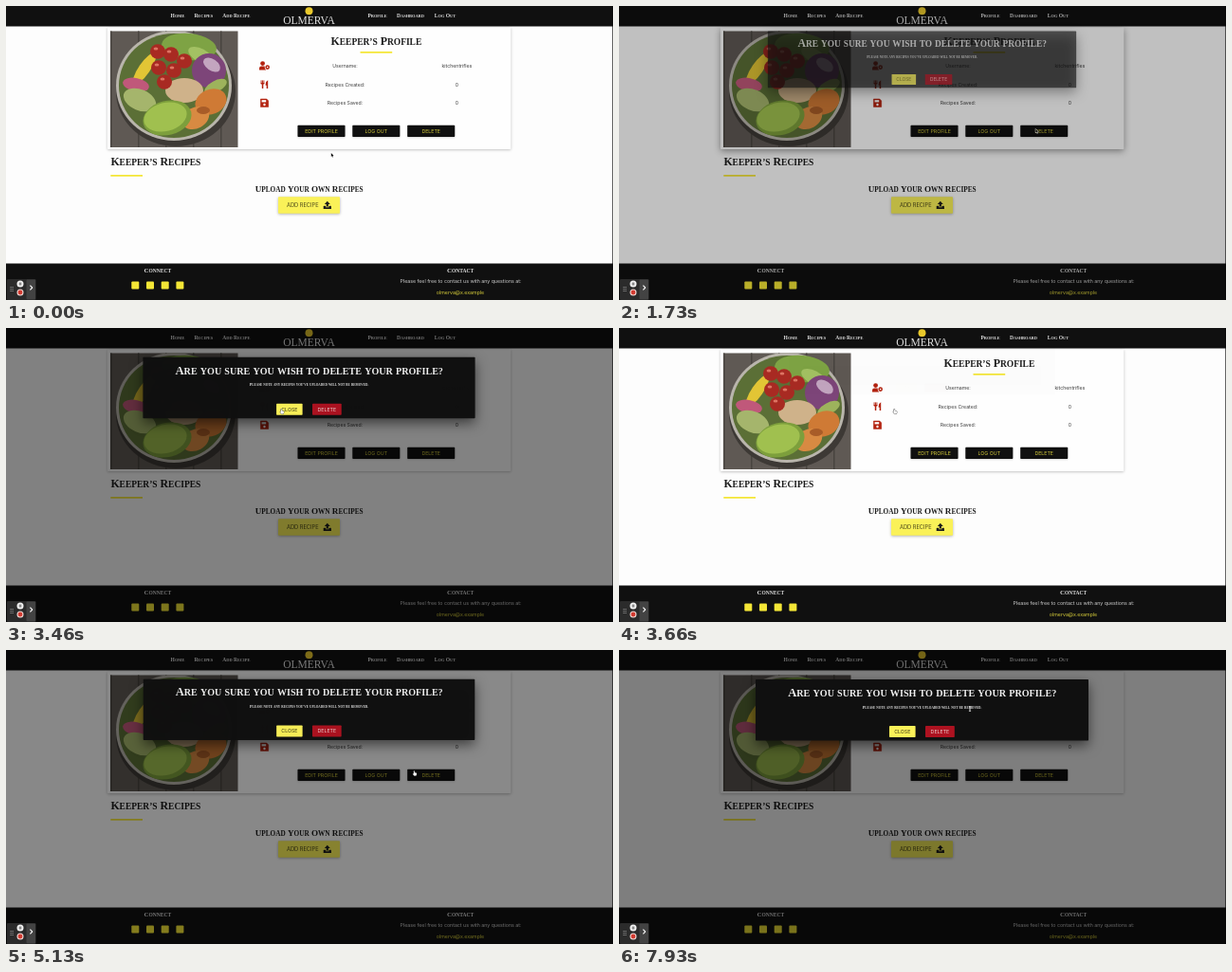
An HTML page with a canvas that plays this animation: 640 by 310 pixels, repeating every 8 s.

```html
<!DOCTYPE html>
<html lang="en">
<head>
<meta charset="utf-8">
<title>Recipe profile</title>
<style>
html, body { margin: 0; width: 100%; height: 100%; overflow: hidden; background: #fdfdfd; }
canvas { display: block; width: 640px; height: 310px; }
</style>
</head>
<body>
<canvas id="stage"></canvas>
<script>
const W = 640, H = 310, LOOP = 8000;
const BLACK = '#101010', YELLOW = '#f4e636', LEMON = '#faf158', RED = '#b3220f', INK = '#1c1c1c';
const SERIF = '"Liberation Serif", serif', SANS = 'Inter, sans-serif';

const canvas = document.getElementById('stage');
const c = canvas.getContext('2d');
const dpr = window.devicePixelRatio || 1;
canvas.width = W * dpr;
canvas.height = H * dpr;

const ramp = (t, start, len) => Math.min(1, Math.max(0, (t - start) / len));
const within = (t, a, b) => t >= a && t < b;
const outPow = (p, n) => 1 - Math.pow(1 - p, n);
const smooth = p => p * p * (3 - 2 * p);

function box(x, y, w, h, fill, r = 0) {
  c.fillStyle = fill;
  c.beginPath();
  c.roundRect(x, y, w, h, r);
  c.fill();
}

function blob(x, y, rx, ry, fill, turn = 0) {
  c.fillStyle = fill;
  c.beginPath();
  c.ellipse(x, y, rx, ry, turn, 0, Math.PI * 2);
  c.fill();
}

function poly(points, fill, stroke, width = 0.7) {
  c.beginPath();
  points.forEach(([x, y]) => c.lineTo(x, y));
  c.closePath();
  if (stroke) {
    c.strokeStyle = stroke;
    c.lineWidth = width;
    c.lineJoin = 'round';
    c.stroke();
  }
  c.fillStyle = fill;
  c.fill();
}

function line(x1, y1, x2, y2, color, width) {
  c.strokeStyle = color;
  c.lineWidth = width;
  c.beginPath();
  c.moveTo(x1, y1);
  c.lineTo(x2, y2);
  c.stroke();
}

function shadow(blur, dy, alpha) {
  c.shadowColor = `rgba(0,0,0,${alpha})`;
  c.shadowBlur = blur * dpr;
  c.shadowOffsetY = dy * dpr;
}

function noShadow() { c.shadowColor = 'transparent'; }

function label(str, x, y, size, color) {
  c.font = `${size}px ${SANS}`;
  c.textAlign = 'center';
  c.fillStyle = color;
  c.fillText(str, x, y);
}

// Engraved capitals: lower-case letters become smaller capitals.
function caps(str, x, y, size, color, left = false) {
  const runs = str.match(/[a-z’?.]+|[^a-z’?.]+/g).map(run => {
    const px = /[a-z’?.]/.test(run) ? size * 0.8 : size;
    const font = `bold ${px}px ${SERIF}`;
    const text = run.toUpperCase();
    c.font = font;
    return { font, text, w: c.measureText(text).width };
  });
  if (!left) x -= runs.reduce((sum, r) => sum + r.w, 0) / 2;
  c.textAlign = 'left';
  c.fillStyle = color;
  for (const r of runs) {
    c.font = r.font;
    c.fillText(r.text, x, y);
    x += r.w;
  }
}

function photo() {
  c.save();
  c.beginPath();
  c.rect(110, 26.5, 134.5, 122.5);
  c.clip();
  box(110, 26, 135, 124, '#5f5954');
  for (let i = 0; i < 5; i++) box(110 + i * 29, 26, 1.5, 124, '#49443f');
  blob(179, 90, 63, 58, '#3d3935');
  blob(177, 84, 61, 58, '#b9b5ac');
  blob(177, 84, 58, 55, '#5b6f36');
  blob(193, 43, 29, 14, '#7ea344', 0.1);
  blob(205, 52, 14, 7, '#a3c163', 0.5);
  blob(214, 68, 18, 18, '#7d4579');
  blob(217, 62, 10, 6, '#c3a5bf', 0.6);
  blob(221, 85, 13, 6, '#9db35c', -0.5);
  blob(146, 66, 6, 20, '#e2c535', 0.6);
  blob(137, 83, 14, 7, '#c0587a', 0.2);
  blob(141, 99, 18, 11, '#a5b56c', 0.4);
  blob(188, 89, 20, 13, '#cfb28a');
  blob(216, 101, 17, 13, '#cf7a35', -0.4);
  blob(200, 118, 15, 11, '#d88a42', -0.5);
  blob(208, 110, 7, 4, '#a85c28');
  blob(170, 118, 26, 18, '#7d9f3c', -0.25);
  blob(168, 117, 23, 15, '#a0c04f', -0.25);
  for (const [x, y] of [[160, 48], [174, 51], [161, 65], [177, 68], [188, 58], [167, 80]]) {
    blob(x, y, 8, 7.8, '#a82a22');
    blob(x - 2, y - 3, 2.4, 1.6, '#dd7463');
  }
  c.restore();
}

function rowIcons() {
  // user with gear
  blob(270.6, 60.6, 2.4, 2.4, RED);
  box(267, 63.6, 7.2, 3.8, RED, [2.2, 2.2, 0.5, 0.5]);
  blob(275.7, 64.6, 2.9, 2.9, '#fff');
  blob(275.7, 64.6, 2.3, 2.3, RED);
  blob(275.7, 64.6, 0.8, 0.8, '#fff');
  // fork and knife
  for (const x of [269.1, 270.5, 271.9]) line(x, 78.4, x, 82, RED, 0.9);
  box(268.6, 81, 3.8, 1.6, RED, 0.8);
  box(269.8, 82, 1.5, 5, RED, 0.5);
  poly([[276.2, 78.3], [276.2, 87], [274.7, 87], [274.7, 83.8], [273.5, 83.6], [274.2, 80]], RED);
  // disk
  poly([[268.4, 98], [274.8, 98], [276.7, 99.9], [276.7, 106.4], [268.4, 106.4]], RED, RED, 0.5);
  box(269.6, 99.2, 4.6, 2.2, '#fff');
  blob(272.5, 104, 1.2, 1.2, '#fff');
}

function button(text, x, hover, hideText) {
  shadow(2, 0.7, 0.22);
  box(x, 125.7, 50, 12.2, hover ? LEMON : BLACK, 0.7);
  noShadow();
  if (!hideText) label(text, x + 25, 133.8, 5.25, hover ? '#4c4918' : '#d9cf3a');
}

function header() {
  box(0, 0, W, 21.6, BLACK);
  const nav = [['Home', 181], ['Recipes', 208.3], ['Add Recipe', 242.8],
    ['Profile', 391.5], ['Dashboard', 426.5], ['Log Out', 463]];
  for (const [text, x] of nav) caps(text, x, 12.3, 5.5, '#dedede');
  blob(319.5, 5.2, 4, 4, '#e9c92c');
  c.font = `11.5px ${SERIF}`;
  c.textAlign = 'center';
  c.fillStyle = '#e0e0e0';
  c.fillText('OLMERVA', 319.5, 18.8);
}

function footer() {
  box(0, 271.6, W, 39, BLACK);
  caps('Connect', 159.8, 280.8, 6.9, '#dedede');
  caps('Contact', 479, 280.8, 6.9, '#dedede');
  for (let i = 0; i < 4; i++) box(132.3 + i * 15.7, 290.4, 8, 8, YELLOW, 1);
  label('Please feel free to contact us with any questions at:', 479.5, 292.2, 5.25, '#cfcfcf');
  label('olmerva@x.example', 479, 304.2, 5.25, '#d9cf3a');
}

function page(lift, delHover, delBlank) {
  box(0, 0, W, H, '#fdfdfd');
  shadow(3 + 6 * lift, 0.8 + 1.7 * lift, 0.26 + 0.2 * lift);
  box(107, 22.5, 425.3, 128.5, '#fefefe', 0.7);
  noShadow();
  photo();
  caps('Keeper’s Profile', 390.4, 40.7, 11.85, INK);
  box(373.5, 48.1, 33.7, 1.6, YELLOW);
  rowIcons();
  const rows = [['Username:', 'kitchentrifles'], ['Recipes Created:', '0'], ['Recipes Saved:', '0']];
  rows.forEach(([name, value], i) => {
    const y = 64.9 + i * 19.7;
    label(name, 357.5, y, 5.2, '#3c3c3c');
    label(value, 475.4, y, 5.2, '#3c3c3c');
  });
  button('EDIT PROFILE', 307.5);
  button('LOG OUT', 365.3);
  button('DELETE', 423.2, delHover, delBlank);

  caps('Keeper’s Recipes', 110.4, 168.1, 11.85, INK, true);
  box(110.3, 178.1, 33.7, 1.6, YELLOW);
  caps('Upload Your Own Recipes', 319.7, 195.8, 9.1, INK);
  shadow(3, 0.8, 0.32);
  box(287, 201.3, 65, 17.4, LEMON, 0.7);
  noShadow();
  label('ADD RECIPE', 312.8, 211.9, 5.7, '#4a471a');
  // upload arrow over a tray
  poly([[338.8, 205.8], [341.8, 209], [339.9, 209], [339.9, 211.6], [337.7, 211.6], [337.7, 209], [335.8, 209]], INK);
  box(334.8, 210.8, 2.3, 3.2, INK, 0.5);
  box(340.5, 210.8, 2.3, 3.2, INK, 0.5);
  box(334.8, 212.3, 8, 1.8, INK, 0.5);
  header();
  footer();
}

function modal(show) {
  if (show <= 0) return;
  const top = 12.4 + 18.6 * show, scale = 0.8 + 0.2 * show;
  c.save();
  c.globalAlpha = show;
  c.translate(319.5, top + 32.25);
  c.scale(scale, scale);
  c.translate(-319.5, -63.25);
  shadow(13, 5, 0.55);
  box(144, 31, 351, 64.5, BLACK, 0.7);
  noShadow();
  caps('Are you sure you wish to delete your profile?', 319.7, 48.8, 12.65, '#f0f0f0');
  caps('Please note any recipes you’ve uploaded will not be removed.', 319.5, 61.5, 4.2, '#e4e4e4');
  box(285, 80, 27.6, 12, LEMON, 0.7);
  label('CLOSE', 298.8, 87.9, 5.25, '#3a3714');
  box(323, 80, 30.8, 12, '#ad1220', 0.7);
  label('DELETE', 338.4, 87.9, 5.25, '#ecd2d2');
  c.restore();
}

function recorder() {
  box(1, 288, 30.5, 22, '#2b2b2b', 1);
  box(21.5, 288.6, 9.6, 20.6, '#434343', 1);
  for (let i = 0; i < 3; i++) {
    box(4.6, 296 + i * 2, 1, 1, '#a8a8a8');
    box(6.6, 296 + i * 2, 1, 1, '#a8a8a8');
  }
  blob(15, 293, 3.5, 3.5, '#f2f2f2');
  box(13.8, 291.6, 0.8, 2.8, '#444');
  box(15.4, 291.6, 0.8, 2.8, '#444');
  blob(15, 302, 3.5, 3.5, '#f0d8d4');
  blob(15, 302, 2.4, 2.4, '#d23a30');
  line(25.4, 294.6, 27.9, 297.1, '#fff', 1.1);
  line(27.9, 296.9, 25.4, 299.4, '#fff', 1.1);
}

const path = [[0, 344, 157.3], [60, 344, 157.3], [860, 440.5, 132], [1910, 440.5, 132],
  [2440, 286, 88], [2860, 286, 88], [3200, 291, 88], [3700, 291, 88], [4660, 431, 130],
  [5700, 431, 130], [6460, 370, 62], [LOOP, 370, 62]];

function pointerAt(t) {
  const i = path.findIndex(k => k[0] > t);
  const [t0, x0, y0] = path[i - 1], [t1, x1, y1] = path[i];
  const p = smooth((t - t0) / (t1 - t0));
  return [x0 + (x1 - x0) * p, y0 + (y1 - y0) * p];
}

function pointer(x, y, kind) {
  c.save();
  c.translate(x, y);
  c.scale(0.85, 0.85);
  if (kind === 'hand') {
    poly([[-1.3, -2.9], [-0.4, -2.9], [-0.3, -0.8], [2.2, -0.2], [2.3, 1.2], [1.6, 3],
      [-0.9, 3], [-2.4, 0.9], [-1.9, 0.3], [-1.2, 0.8]], '#fff', '#444', 1);
  } else if (kind === 'beam') {
    line(0, -2.9, 0, 2.9, '#fff', 1);
    line(-1.3, -2.9, 1.3, -2.9, '#ddd', 0.8);
    line(-1.3, 2.9, 1.3, 2.9, '#ddd', 0.8);
  } else {
    poly([[-1.4, -2.8], [-1.4, 1.8], [-0.4, 1], [0.4, 2.7], [1.1, 2.4], [0.4, 0.8], [1.8, 0.6]],
      '#111', '#fff', 0.9);
  }
  c.restore();
}

const clicks = [[1560, 1690], [3380, 3460], [4860, 5000]];

function draw(t) {
  c.setTransform(dpr, 0, 0, dpr, 0, 0);
  const closing = within(t, 3460, 4950);
  const open = ramp(t, t < 3460 ? 1660 : 4950, 250);
  const close = ramp(t, 3460, 250);
  const show = closing ? 1 - outPow(close, 3) : outPow(open, 3);
  const veil = closing ? 1 - outPow(close, 4) : outPow(open, 2);
  const lift = ramp(t, 250, 250) - ramp(t, 1660, 250) + ramp(t, 3700, 250) - ramp(t, 4950, 200);
  const [x, y] = pointerAt(t);
  const overDelete = x > 423 && x < 473.5 && y > 125.5 && y < 138;
  const hover = overDelete && (t < 1660 || within(t, 3710, 4950));

  page(lift, hover, hover && t > 1600);
  box(0, 0, W, H, `rgba(0,0,0,${veil * 0.5})`);
  modal(show);
  box(639, 0, 1, H, 'rgba(0,0,0,0.6)');
  recorder();

  if (clicks.some(([a, b]) => within(t, a, b))) {
    c.beginPath();
    c.arc(x, y - 1.8, 10.4, 0, Math.PI * 2);
    c.fillStyle = 'rgba(200,60,70,0.06)';
    c.fill();
    c.strokeStyle = '#bd3a45';
    c.lineWidth = 1.2;
    c.stroke();
  }
  const hand = hover || within(t, 1660, 1730) || within(t, 2380, 3740) || within(t, 4950, 5170);
  pointer(x, y, hand ? 'hand' : t > 6380 ? 'beam' : 'arrow');
}

const start = performance.now();

function tick(now) {
  draw(Math.max(0, now - start) % LOOP);
  requestAnimationFrame(tick);
}

requestAnimationFrame(tick);
</script>
</body>
</html>
```
